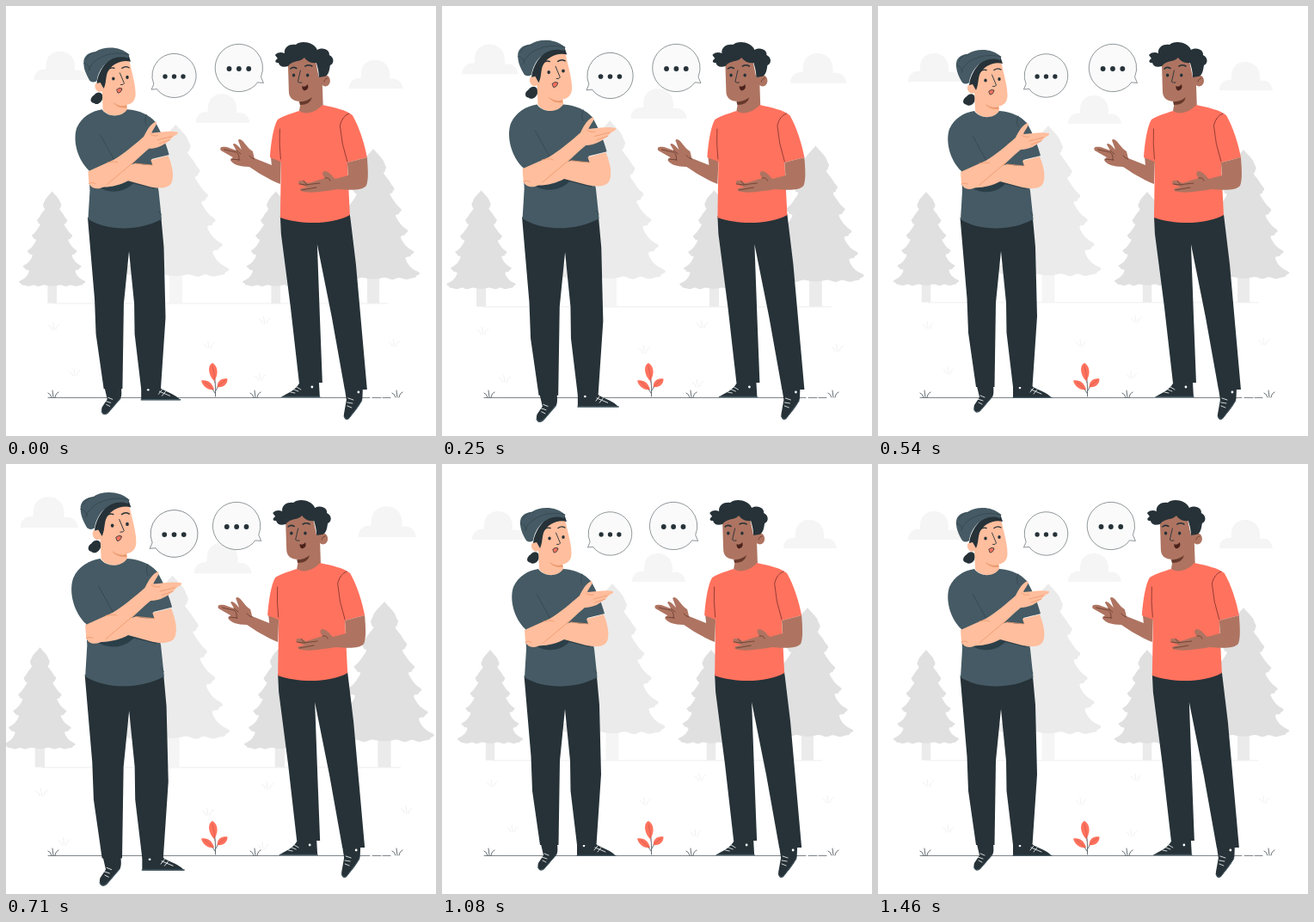
Animation of 500 by 500 pixels, one loop 1500 ms. Source, as an HTML page with a canvas:

```html
<!DOCTYPE html>
<html lang="en">
<head>
<meta charset="utf-8">
<title>Conversation</title>
<style>
html, body { margin: 0; width: 100%; height: 100%; overflow: hidden; background: #fff; }
canvas { display: block; width: 500px; height: 500px; }
</style>
</head>
<body>
<canvas id="stage"></canvas>
<script>
const canvas = document.getElementById('stage');
const ctx = canvas.getContext('2d');
const ratio = window.devicePixelRatio || 1;
canvas.width = canvas.height = 500 * ratio;

const DARK = '#263238', SLATE = '#455a64', CORAL = '#ff725e';
const PEACH = '#ffbe9d', BROWN = '#ae7461';
const LOOP = 1500, STEP = LOOP / 36, LEAD = 20;

// Keys are [time, value] pairs joined by straight lines.
const PULSE = [[0, 0], [150, 1], [450, 0], [600, 0], [735, 1], [750, 1], [900, 0], [1500, 0]];
const SHAKE = [0, -1, 2, -4, 4, -4, 4, -4, 2, -1, 0].map((x, i) => [i * 150, x]);

function tween(keys, t) {
  const i = keys.findIndex(k => k[0] > t);
  const [t0, a] = keys[i - 1], [t1, b] = keys[i];
  return a + (b - a) * (t - t0) / (t1 - t0);
}

function fill(color, d) {
  ctx.fillStyle = color;
  ctx.fill(new Path2D(d));
}

function line(color, width, d) {
  ctx.strokeStyle = color;
  ctx.lineWidth = width;
  ctx.stroke(new Path2D(d));
}

function dot(color, x, y, rx, ry = rx, turn = 0) {
  ctx.fillStyle = color;
  ctx.beginPath();
  ctx.ellipse(x, y, rx, ry, turn, 0, Math.PI * 2);
  ctx.fill();
}

function zoomed(cx, cy, scale, draw) {
  ctx.save();
  ctx.translate(cx, cy);
  ctx.scale(scale, scale);
  ctx.translate(-cx, -cy);
  draw();
  ctx.restore();
}

function cloud(x, base) {
  ctx.save();
  ctx.translate(x, base);
  fill('#f5f5f5', `M-30 0C-30-9-23-13-17-12C-16-13-16-14-16-17C-16-27-9-33 0-33
    C10-33 17-26 17-16L17-11C25-13 31-8 32 0Z`);
  ctx.restore();
}

function tree(x, top, w, h, color, trunk, trunkWidth, tiers = 6) {
  ctx.fillStyle = trunk;
  ctx.fillRect(x - trunkWidth / 2, top + h - 8, trunkWidth, 344.5 - top - h + 8);
  const side = [[0, top], [1.5, top + 2]], d = h / tiers;
  for (let i = 1; i <= tiers; i++) {
    const r = w * (i / tiers) ** 0.72, y = top + d * i;
    side.push([r * .76, y - d * .5], [r * .88, y - d * .28], [r * 1.01, y - d * .16], [r, y - d * .06],
      [r * .92, y], [r * .93, y + d * .09], [r * .83, y + d * .1]);
    if (i < tiers) side.push([r * .78, y + d * .16]);
  }
  side.push([w * .7, top + h + d * .2], [w * .55, top + h + d * .05], [w * .42, top + h + d * .22],
    [w * .25, top + h + d * .05], [w * .12, top + h + d * .15]);
  const pts = [...side, ...side.slice(1).reverse().map(([px, py]) => [-px, py])];
  ctx.fillStyle = color;
  ctx.beginPath();
  ctx.moveTo(x, top);
  pts.slice(1).forEach(([px, py], i) => {
    const next = pts[(i + 2) % pts.length];
    ctx.quadraticCurveTo(x + px, py, x + (px + next[0]) / 2, (py + next[1]) / 2);
  });
  ctx.fill();
}

function tuft(x, y, color) {
  line(color, .7, `M${x - 2} ${y}Q${x - 3} ${y - 4} ${x - 6} ${y - 5}M${x} ${y}L${x - 1} ${y - 8}
    M${x + 2} ${y}Q${x + 3} ${y - 5} ${x + 6} ${y - 6}`);
}

function bubble(x, y, r, dir) {
  const a = dir < 0 ? 2.3 : .84, b = dir < 0 ? 2.75 : .39;
  ctx.beginPath();
  ctx.arc(x, y, r, a, b, dir < 0);
  ctx.lineTo(x + dir * r * 1.03, y + r * .63);
  ctx.lineTo(x + dir * r * .79, y + r * .61);
  ctx.closePath();
  ctx.fillStyle = '#fafafa';
  ctx.fill();
  ctx.strokeStyle = DARK;
  ctx.lineWidth = .5;
  ctx.stroke();
  for (const i of [-1, 0, 1]) dot(DARK, x + i * r * .41, y + 1, r * .105);
}

function scenery() {
  cloud(65, 88);
  cloud(251, 137);
  cloud(427, 98);
  line('#ebebeb', .8, 'M58 344.8H442');
  tree(198, 139, 61, 170, '#ebebeb', '#f5f5f5', 15);
  tree(313, 216, 38, 106, '#e0e0e0', '#ebebeb', 10.5);
  tree(425, 167, 53, 146, '#e0e0e0', '#ebebeb', 14);
  tree(56, 216, 38, 106, '#e0e0e0', '#ebebeb', 10.5);
  [[58, 375], [82, 428], [236, 396], [300, 368], [295, 433], [449, 394]]
    .forEach(([x, y]) => tuft(x, y, '#ebebeb'));
}

function ground() {
  line(DARK, .6, 'M49 455.5H423M426 455.5H436M438 455.5H447');
  [55, 290, 455].forEach(x => tuft(x, 455, DARK));
  line(DARK, .7, 'M243.5 454C244 442 243 432 241 420M243 450Q240 444 231 438M244 447Q247 440 255 436');
  fill(CORAL, `M242 436C235 429 234 418 240 415C246 418 248 428 242 436ZM242 446C235 447 229 443 227 435.5
    C234 434 240 438 242 446ZM246 443C245 436 251 432 257.5 433.5C258 440 252 444 246 443Z`);
  line('#b9483b', .5, 'M242.5 438Q243 428 240 419M241 446L231 437M245 443L255 435');
}

function leftMan() {
  fill(DARK, 'M115 442H134C135 451 134 454 131 457L119 471C114 475 110 471 112 464L118 455Z');
  line(SLATE, 1, 'M111.5 469Q114 475 120 469L133 454');
  line('#fff', .8, 'M116 457L122 459M117 461L121 463M119 453L124 455');
  fill(DARK, 'M157 442H179C186 447 197 449 202 456H157Z');
  line(SLATE, 1.3, 'M157 455.4H202');
  line('#fff', .8, 'M177 449L181 444M181 451L185 446M178 446L190 451');
  dot('#fff', 165, 444, 1.3);
  fill(DARK, `M95.5 246C118 258 155 258 180 247L183 280L185 361L179.5 443H157L149.5 380L149 345L143 285L137 345L135.5 443H114
    L105 380L103.5 340Z`);

  dot(DARK, 107, 109, 5.5, 7, .5);
  dot(DARK, 103, 110, 3.5, 4.5, .5);
  fill(PEACH, 'M112 98L113 122C118 131 135 132 141 122L140 110Z');
  fill('#eb996e', 'M124 113Q132 120 140 117L140.5 120Q129 121 124 113Z');
  fill(PEACH, `M111 90C112 76 127 63 143 64C146 79 151 94 150.5 105C150 115 142 118 133 116
    C123 115 114 109 112 101C105 105 100 91 108 91Z`);
  fill(DARK, 'M106 92C108 74 124 55 142 58L145 67C135 64 122 70 118 80C116 87 117 91 114 98L110 91Z');
  fill(SLATE, 'M98 89C94 82 91 76 91 69C90 61 97 56 104 56C114 49 133 49 143 59L142 63C126 57 109 70 106 89Q102 92 98 89Z');
  line('#37474f', .8, 'M97 77C99 65 121 53 143 59M94 64Q98 56 106 56M91 69Q97 70 98 76');
  line(DARK, 1.4, 'M118 77Q121 73 126 74.5M135 74.5Q139 71.5 143 74');
  dot(DARK, 125, 86.5, 1.7, 2);
  dot(DARK, 141, 85, 1.7, 2);
  line(DARK, .9, 'M132.5 80L137.5 92Q137 94 133.5 93.5');
  fill(CORAL, 'M129 99Q132 96 135 98Q134 103 130.5 103Z');
  line(DARK, .8, 'M129 99Q132 96 135 98Q134 103 130.5 103Z');

  fill(SLATE, `M112 122C118 131 134 132 141 122C155 123 166 128 173 136C180 148 186 162 189 174L169 179L177 215L180.5 248
    C155 262 118 262 96 248L98 215L97 192C84 180 78 158 83 143C89 130 100 124 112 122Z`);
  line('#37474f', .8, 'M110 151L126 180M163 128Q160 135 163 140M177 239L180 243');
  fill('#2b3f49', 'M108 211C121 219 137 218 148 207L172 213L174 208L140 196L110 205Z');
  fill(PEACH, `M168 180L188 175C193 187 195 199 192 206C189 213 178 213 168 211L142 204C133 209 120 212 110 211
    L130 190L150 184Q160 186 170 186Z`);
  fill(PEACH, `M96 193L125 180C137 173 151 161 160 153C164 145 168 138 174 136C177 138 170 145 169 149
    C180 148 191 146 199 148C200 151 195 151 192 155C185 162 176 167 166 167C150 180 135 198 117 209
    C108 215 100 214 97 207Z`);
  line('#eb996e', .8, `M118 183Q128 181 130 183M97 207Q101 205 104 207M150 181L118 208
    M167 150Q170 153 176 152M176 157L192 153M178 161L190 157M150 184L170 186`);
}

function rightMan() {
  fill(DARK, 'M342 437L364 437L365 454.5H321C326 450 337 448 342 437Z');
  line(SLATE, 1.2, 'M321 454.4H365');
  line('#fff', .8, 'M335 446L340 448M338 443L343 446M331 449L336 450');
  dot('#fff', 356, 443, 1.4);
  fill(DARK, 'M394 445H415L414.5 457C411 467 403 474 399 480C394 483 392 478 393.5 472L396 458Z');
  line(SLATE, 1, 'M393 477Q396 483 400 478L414 459');
  line('#fff', .8, 'M397 461L403 462M397 465L402 467M398 456L404 458');
  dot('#fff', 410, 449, 1.4);
  fill(DARK, `M319 244C345 253 380 252 400 242L407 300L420 446H394L379 362L362 277L365 360L368 438H341L331 350L320 265Z`);

  fill(BROWN, `M308 175L320 179L319 207C304 201 292 193 283 187C272 187 263 184 261 179L264 176L250 168
    C248 164 251 163 257 164L268 168L264 161C266 158 270 163 274 167L270 156C274 151 279 164 287 169L289 177L309 185Z`);
  line('#66392c', .8, 'M254 167L268 170Q272 173 271 179M262 178L272 179M268 168L273 172M283 174Q285 177 289 178');

  fill(BROWN, `M328 67L340 54H358L364 83C370 78 377 80 377 87C377 93 371 95 368 92L369 121
    C360 128 347 128 341 122L343 111C334 111 329 107 329 99Z`);
  fill('#66392c', 'M341 111Q349 112 356 106Q354 115 342 115Z');
  fill(DARK, `M328 70C322 72 318 70 317 66C313 66 312 64 316 61L313 57C317 53 321 54 324 55C323 47 331 44 337 45
    C342 40 358 41 362 51C370 47 377 52 376 57C382 60 382 67 377 69C376 77 374 82 370 82L364 83
    C364 75 362 70 361 66C355 67 350 64 347 60C342 66 334 62 328 70Z`);
  line(DARK, 1.5, 'M331 73Q334 70 338 72.5M348 70Q352 67.5 356 70');
  dot(DARK, 334.7, 80.5, 1.7, 2);
  dot(DARK, 350.8, 80.5, 1.7, 2);
  line(DARK, .9, 'M342.5 75L339.5 88Q341 90 344 89');
  fill('#4a211c', 'M344.5 93Q348 95 351 91Q353 97 347 98.5Q344 97 344.5 93Z');
  line('#66392c', .8, 'M370 88Q371 84 374 84');

  fill(CORAL, `M341 122C348 127 360 124 368 115C382 118 396 121 403 127C411 141 417 160 420 176L397 182L400 243
    C380 254 345 255 319 246L320 181L307 176C308 160 311 140 316 132C324 127 332 125 341 122Z`);
  line('#7d2f2b', .8, 'M318.5 143Q317.5 160 319.5 178M397 181Q390 160 388.5 139Q391 128 399 125');

  fill(BROWN, `M397 182L420 176C421 190 422 202 419 209C414 215 400 214 386 213C372 215 354 219 343 215
    C340 212 346 211 351 211L341 207C338 202 345 202 352 206L371 200C367 196 368 192 371 192C377 193 379 198 383 201L398 197Z`);
  line('#66392c', .8, 'M341 207Q349 209 356 207L365 206M344 214L361 211M346 203L350 208M371 200Q376 199 377 203');
}

function draw(now) {
  // Poses advance 24 times a second.
  const t = (Math.floor((now % LOOP + 5) / STEP) * STEP + LEAD) % LOOP;
  const scale = 1 + .09 * tween(PULSE, t);
  ctx.setTransform(ratio, 0, 0, ratio, 0, 0);
  ctx.lineCap = ctx.lineJoin = 'round';
  ctx.fillStyle = '#fff';
  ctx.fillRect(0, 0, 500, 500);
  zoomed(250, 250, scale, scenery);
  ground();
  zoomed(141, 261, scale, leftMan);
  zoomed(195.5, 81, scale, () => bubble(195.5, 81, 25.3, -1));
  ctx.translate(tween(SHAKE, t), 0);
  rightMan();
  bubble(271, 72, 27.7, 1);
}

const start = performance.now();
function tick() {
  draw(performance.now() - start);
  requestAnimationFrame(tick);
}
tick();
</script>
</body>
</html>
```
